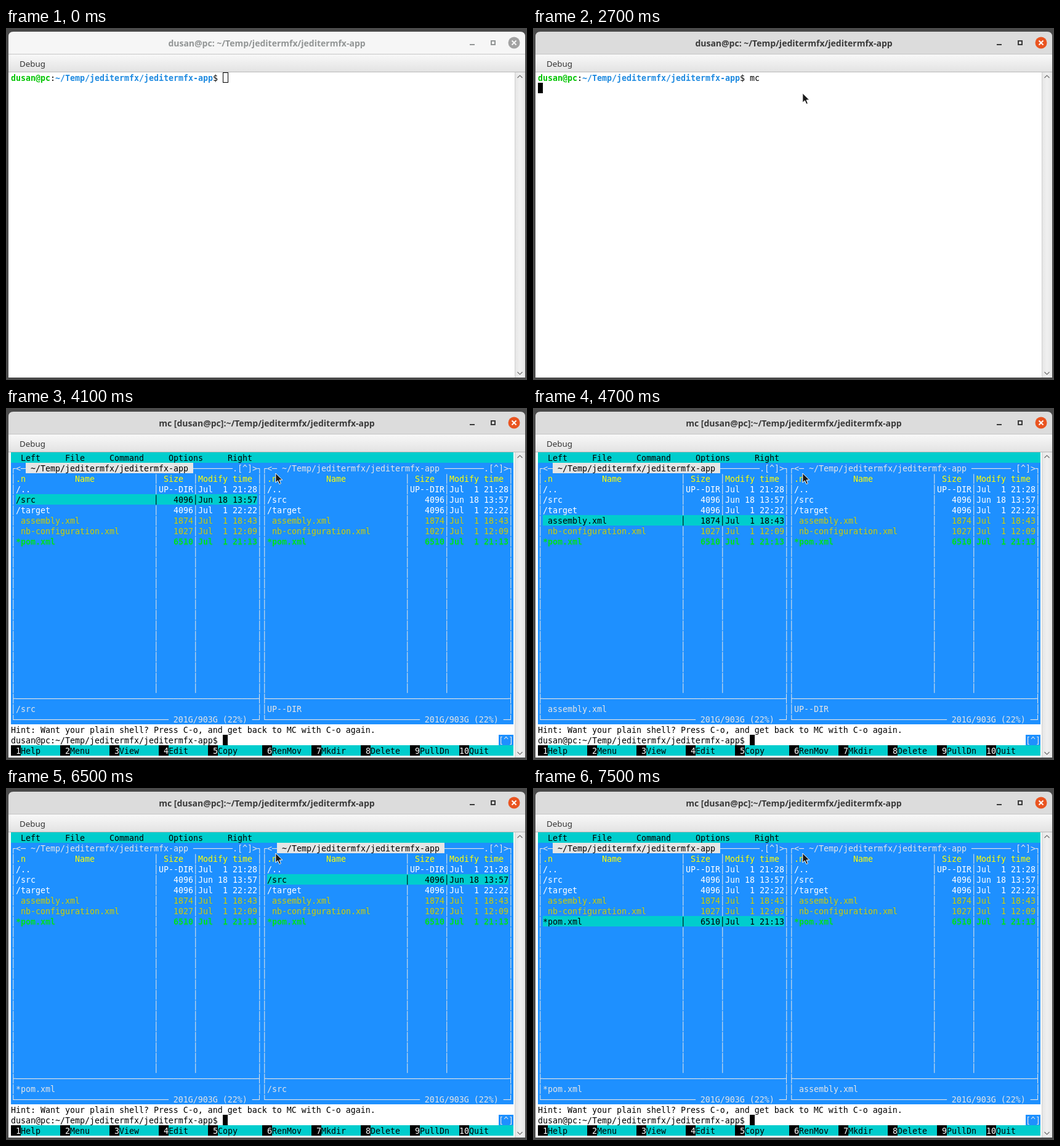
Recreate the animation shown at these times as an HTML page. Size 846 by 572 pixels, loop 8000 ms.

```html
<!DOCTYPE html>
<html lang="en">
<head>
<meta charset="utf-8">
<title>Terminal</title>
<style>
  html, body { margin: 0; width: 100%; height: 100%; overflow: hidden; background: #4a4a4a; }
  svg { display: block; width: 846px; height: 572px; }
  text { white-space: pre; }
  .mono { font: 13.29px "DejaVu Sans Mono", monospace; }
  .ui { font-family: "Noto Sans", sans-serif; }
</style>
</head>
<body>
<svg id="stage" viewBox="0 0 846 572" xmlns="http://www.w3.org/2000/svg">
  <defs>
    <linearGradient id="menuFill" x2="0" y2="1">
      <stop offset="0" stop-color="#f8f8f8"/><stop offset="1" stop-color="#e2e2e2"/>
    </linearGradient>
    <linearGradient id="barFill">
      <stop offset="0" stop-color="#e4e4e4"/><stop offset=".5" stop-color="#f0f0f0"/><stop offset="1" stop-color="#e6e6e6"/>
    </linearGradient>
  </defs>
  <rect width="846" height="572" fill="#4a4a4a"/>
  <path id="titleBar" d="M4 43V14q0-8 8-8H835q8 0 8 8V43Z"/>
  <path d="M4 42.5H843" stroke="#c6c6c6"/>
  <text id="title" class="ui" x="423.5" y="30" font-size="14" font-weight="700" text-anchor="middle"></text>
  <g id="buttons">
    <path d="M753 26h8v2h-8Z"/>
    <path d="M787 20h8v8h-8Zm2 2v4h4v-4Z" fill-rule="evenodd"/>
  </g>
  <circle id="close" cx="825" cy="24" r="9.5"/>
  <path id="cross" d="M821.5 20.5l7 7m0-7l-7 7" stroke-width="2"/>
  <rect x="4" y="43" width="839" height="29" fill="url(#menuFill)"/>
  <path d="M4 71.5H843" stroke="#b9b9b9"/>
  <text class="ui" x="22" y="63" font-size="13.33" fill="#333">Debug</text>
  <rect x="4" y="72" width="839" height="496" fill="#fff"/>
  <rect x="826" y="72" width="17" height="496" fill="url(#barFill)"/>
  <path d="M826.5 72V568" stroke="#cfcfcf"/>
  <path d="M830.5 81l4-4 4 4M830.5 559l4 4 4-4" fill="none" stroke="#707070" stroke-width="1.2"/>
  <g id="shell" class="mono"></g>
  <g id="commander" class="mono"></g>
  <rect id="caret"/>
  <path id="pointer" d="M.8 1V16.2L4.4 13l2.5 5.7 2.5-1.1L7 12h4.8Z" fill="#1a1a1a" stroke="#fff" stroke-width="1"/>
</svg>
<script>
const CW = 8, CH = 17, X0 = 8, Y0 = 72, LOOP = 8000;
const BLUE = '#1e90ff', CYAN = '#00cdcd', GRAY = '#e5e5e5', YELLOW = '#ffff00', OLIVE = '#cdcd00', LIME = '#00e01e';
const DIR = '~/Temp/jeditermfx/jeditermfx-app';
const USER = 'dusan@pc';
const FILES = [
  ['/..', 'UP--DIR', 'Jul  1 21:28', '#fff'],
  ['/src', '4096', 'Jun 18 13:57', '#fff'],
  ['/target', '4096', 'Jul  1 22:22', '#fff'],
  [' assembly.xml', '1874', 'Jul  1 18:43', OLIVE],
  [' nb-configuration.xml', '1027', 'Jul  1 12:09', OLIVE],
  ['*pom.xml', '6510', 'Jul  1 21:13', LIME]
];
const KEYS = ['Help', 'Menu', 'View', 'Edit', 'Copy', 'RenMov', 'Mkdir', 'Delete', 'PullDn', 'Quit'];

const $ = id => document.getElementById(id);
const set = (el, attrs) => { for (const k in attrs) el.setAttribute(k, attrs[k]); return el; };
const add = (parent, tag, attrs) =>
  parent.appendChild(set(document.createElementNS('http://www.w3.org/2000/svg', tag), attrs));
const show = (el, on) => set(el, { visibility: on ? 'visible' : 'hidden' });

function fill(parent, col, row, cols, rows, color) {
  return add(parent, 'rect', { x: X0 + col * CW, y: Y0 + row * CH, width: cols * CW, height: rows * CH, fill: color });
}
function print(parent, col, row, str, color, bold) {
  const el = add(parent, 'text', { x: X0 + col * CW, y: Y0 + row * CH + 14, fill: color });
  if (bold) el.setAttribute('font-weight', 700);
  el.textContent = str;
  return el;
}

// Shell prompt
const shell = $('shell');
print(shell, 0, 0, USER, '#00c400', true);
print(shell, 8, 0, ':', '#000');
print(shell, 9, 0, DIR, '#1e8ae0', true);
print(shell, 41, 0, '$', '#000');
const typed = print(shell, 43, 0, '', '#000');

// File manager
const commander = $('commander');

function makePanel(col) {
  const put = (parent, c, r, s, color, bold) => print(parent, col + c, r, s, color, bold);
  const line = n => '─'.repeat(n);
  put(commander, 0, 1, '┌<─', GRAY);
  put(commander, 37, 1, line(8) + '.[^]>┐', GRAY);
  put(commander, 1, 2, '.n', YELLOW);
  put(commander, 13, 2, 'Name', YELLOW);
  put(commander, 31, 2, 'Size', YELLOW);
  put(commander, 38, 2, 'Modify time', YELLOW);
  for (let r = 2; r < 25; r++) {
    if (r === 23) continue;
    for (const c of r < 23 ? [0, 29, 37, 50] : [0, 50]) put(commander, c, r, '│', GRAY);
  }
  put(commander, 0, 23, '├' + line(49) + '┤', GRAY);
  put(commander, 0, 25, '└' + line(31) + ' 201G/903G (22%) ─┘', GRAY);

  const tab = fill(commander, col + 3, 1, 34, 1, GRAY);
  const path = put(commander, 4, 1, DIR, GRAY);
  const rows = FILES.map(([name, size, date, color], i) => {
    const r = i + 3;
    const version = (ink, bold) => {
      const g = add(commander, 'g', {});
      if (ink === '#000') {
        fill(g, col + 1, r, 49, 1, CYAN);
        put(g, 29, r, '│', ink);
        put(g, 37, r, '│', ink);
      }
      put(g, 1, r, name, ink, bold);
      put(g, 37 - size.length, r, size, ink, bold);
      put(g, 38, r, date, ink, bold);
      return g;
    };
    return { plain: version(color, color === LIME), picked: version('#000') };
  });
  const info = put(commander, 1, 24, '', GRAY);

  return (active, index) => {
    show(tab, active);
    set(path, { fill: active ? '#000' : GRAY });
    rows.forEach((row, i) => {
      const picked = active && i === index;
      show(row.plain, !picked);
      show(row.picked, picked);
    });
    info.textContent = index ? FILES[index][0] : 'UP--DIR';
  };
}

fill(commander, 0, 0, 102, 1, CYAN);
[['Left', 2], ['File', 11], ['Command', 20], ['Options', 32], ['Right', 44]]
  .forEach(([s, c]) => print(commander, c, 0, s, '#000'));
fill(commander, 0, 1, 102, 25, BLUE);
const leftPanel = makePanel(0), rightPanel = makePanel(51);
print(commander, 0, 26, 'Hint: Want your plain shell? Press C-o, and get back to MC with C-o again.', '#000');
print(commander, 0, 27, `${USER}:${DIR}$`, '#000');
fill(commander, 99, 27, 3, 1, BLUE);
print(commander, 99, 27, '[^]', GRAY);
fill(commander, 0, 28, 102, 1, CYAN);
KEYS.forEach((key, i) => {
  const c = Math.floor(i * 10.2);
  fill(commander, c, 28, 2, 1, '#000');
  print(commander, c, 28, String(i + 1).padStart(2), '#fff');
  print(commander, c + 2, 28, key, '#000');
});

// Value of the last [time, value...] step already reached
const at = (steps, t) => steps.filter(s => s[0] <= t).pop().slice(1);

const POINTER = [[0, -50, -50], [400, 557, 96], [600, 422, 105], [1100, 430, 105], [1200, 437, 105]];
const TYPED = [[0, ''], [2100, 'm'], [2200, 'mc']];
const CARET = [[0, 43, 0, 1], [1900, 43, 0, 0], [2100, 44, 0, 1], [2200, 45, 0, 1], [2700, 0, 1, 1],
  [3000, 43, 27, 1], [3800, 43, 27, 0], [4100, 43, 27, 1]];
const LEFT = [[0, 0], [4100, 1], [4500, 2], [4700, 3], [5400, 5]];
const RIGHT = [[0, 0], [6500, 1], [6600, 2], [7000, 3]];

function render(t) {
  const focused = t >= 800, running = t >= 3000;
  const ink = focused ? '#3a3a3a' : '#929595';
  set($('titleBar'), { fill: focused ? '#dcdcdc' : '#f6f6f6' });
  set($('title'), { fill: ink }).textContent = running ? `mc [${USER}]:${DIR}` : `${USER}: ${DIR}`;
  set($('buttons'), { fill: ink });
  set($('close'), { fill: focused ? '#e95420' : '#a2a2a2' });
  set($('cross'), { stroke: focused ? '#fff' : '#f6f6f6' });

  show(shell, !running);
  typed.textContent = at(TYPED, t)[0];
  $('commander').style.display = running ? '' : 'none';
  const onRight = t >= 6000 && t < 7500;
  leftPanel(!onRight, at(LEFT, t)[0]);
  rightPanel(onRight, at(RIGHT, t)[0]);

  const [col, row, lit] = at(CARET, t);
  const inset = focused ? 0 : 0.5;
  show($('caret'), lit);
  set($('caret'), {
    x: X0 + col * CW + inset, y: Y0 + row * CH + inset, width: CW, height: CH - 2 * inset,
    fill: focused ? '#000' : 'none', stroke: focused ? 'none' : '#000'
  });
  const [px, py] = at(POINTER, t);
  set($('pointer'), { transform: `translate(${px} ${py})` });
}

const start = performance.now();
function tick() {
  render((performance.now() - start) % LOOP);
  requestAnimationFrame(tick);
}
render(0);
requestAnimationFrame(tick);
</script>
</body>
</html>
```
